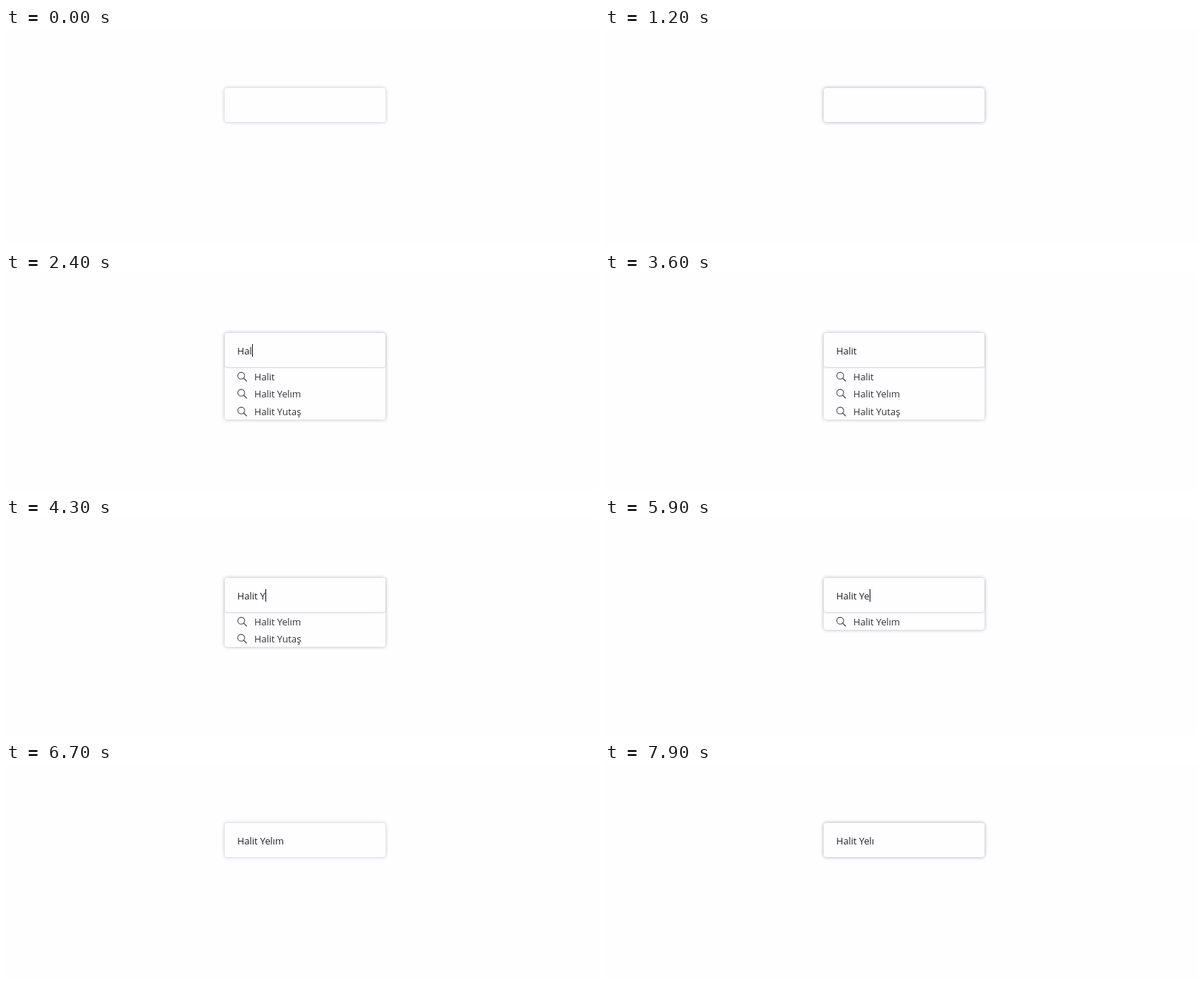
An HTML page for the animation above (8 s loop, 800 by 293 pixels).

```html
<!DOCTYPE html>
<html lang="tr">
<head>
<meta charset="utf-8">
<title>Arama kutusu</title>
<style>
  html, body { margin: 0; width: 100%; height: 100%; overflow: hidden; background: #fefdff; }
  body { position: relative; font: 12.8px/24px "Open Sans", "Noto Sans", sans-serif; color: #222; }
  div, span, svg { position: absolute; white-space: pre; }
  #field, #list { left: 295px; top: 81px; width: 217px; border-radius: 4px; background: #fefdff; }
  #field { height: 46px; box-shadow: 0 0 5px rgba(35, 30, 60, .27); }
  #field.focused { box-shadow: 0 0 5px rgba(20, 18, 35, .36); }
  #field.open { box-shadow: 0 1px 2px rgba(35, 30, 55, .2); }
  #list { box-shadow: 0 0 5px rgba(30, 25, 50, .32); }
  #typed { left: 17px; top: 12px; }
  #caret { top: 15px; width: 1px; height: 17px; background: #111; }
  .row { left: 0; height: 24px; color: #333; }
  .row span { left: 40px; top: 0; }
  .row svg { left: 17px; top: 5px; fill: none; stroke: #4a4a4a; stroke-width: 1.1; stroke-linecap: round; }
</style>
</head>
<body>
<div id="list"></div>
<div id="field"><span id="typed"></span><div id="caret"></div></div>
<script>
const LOOP = 8000, BLINK = 500;
const FOCUS = 700, PICK = 6400, REFOCUS = 7300, ERASE = 7700;
const keyTimes = [1600, 2100, 2400, 2700, 3000, 3800, 4300, 4800];
const FIELD_HEIGHT = 46, ROW_HEIGHT = 23.6, ROW_OFFSET = 0.6, TEXT_LEFT = 17;
const names = ["Halit", "Halit Yelım", "Halit Yutaş"];
const chosen = names[1];

const [list, field, typed, caret] = ["list", "field", "typed", "caret"]
  .map(id => document.getElementById(id));

const rows = names.map(name => {
  const row = document.createElement("div");
  row.className = "row";
  row.innerHTML = `<svg width="15" height="15"><circle cx="5.3" cy="5.7" r="4.6"/><path d="M8.6 9l4 4"/></svg><span>${name}</span>`;
  return list.appendChild(row);
});

function draw(time) {
  const picked = time >= PICK;
  const focused = time >= FOCUS && !picked || time >= REFOCUS;
  const typedCount = keyTimes.filter(key => key <= time).length;
  const open = typedCount > 0 && !picked;
  const text = chosen.slice(0, picked ? chosen.length - (time >= ERASE) : typedCount);

  // Typing and focusing restart the caret's blink cycle.
  const blinkStart = [FOCUS, ...keyTimes, REFOCUS].findLast(start => start <= time);
  typed.textContent = text;
  caret.hidden = !focused || Math.floor((time - blinkStart) / BLINK) % 2 === 1;
  caret.style.left = Math.round(TEXT_LEFT + typed.getBoundingClientRect().width) + "px";
  field.className = open ? "open" : focused ? "focused" : "";

  let shown = 0;
  rows.forEach((row, i) => {
    row.hidden = !names[i].startsWith(text);
    if (!row.hidden) row.style.top = FIELD_HEIGHT + ROW_OFFSET + ROW_HEIGHT * shown++ + "px";
  });
  list.hidden = !open;
  list.style.height = FIELD_HEIGHT + ROW_HEIGHT * shown + "px";
}

function tick() {
  draw(performance.now() % LOOP);
  requestAnimationFrame(tick);
}
tick();
</script>
</body>
</html>
```
